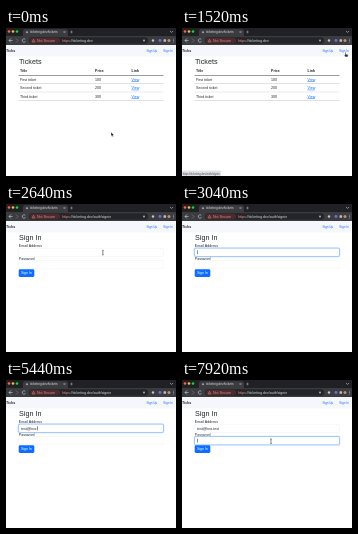
An HTML page with a canvas for the animation above (8000 ms loop, 170x148 px).

```html
<!DOCTYPE html>
<html lang="en">
<head>
<meta charset="utf-8">
<title>Tickets</title>
<style>
html, body { margin: 0; width: 100%; height: 100%; overflow: hidden; background: #fff; }
canvas { display: block; width: 170px; height: 148px; }
</style>
</head>
<body>
<canvas id="stage" width="170" height="148"></canvas>
<script>
const ctx = document.getElementById('stage').getContext('2d');
const LOOP = 8000;
const BLUE = '#0d6efd', INK = '#212529';
const EMAIL = 'test@box.test';
const keyTimes = [3680, 3920, 4080, 4320, 4720, 4960, 5200, 5280, 5440, 6640, 6800, 6960, 6960];
// Pointer stops: time, x, y
const path = [
  [0, 105, 104], [80, 105, 104], [240, 130, 59], [720, 130, 59],
  [1440, 163, 24], [2000, 163, 24], [2240, 121, 44], [2800, 91, 47], [7360, 91, 56], [7600, 89, 59]
];

function box(x, y, w, h, fill, r = 0) {
  ctx.fillStyle = fill;
  ctx.beginPath();
  ctx.roundRect(x, y, w, h, r);
  ctx.fill();
}

function text(s, x, y, size = 3.6, color = INK, weight = 400) {
  ctx.font = `${weight} ${size}px "Liberation Sans", sans-serif`;
  ctx.fillStyle = color;
  ctx.fillText(s, x, y);
  return ctx.measureText(s).width;
}

function dot(x, y, r, color) {
  box(x - r, y - r, 2 * r, 2 * r, color, r);
}

function line(points, color, width = 0.6) {
  ctx.strokeStyle = color;
  ctx.lineWidth = width;
  ctx.beginPath();
  points.forEach(([x, y]) => ctx.lineTo(x, y));
  ctx.stroke();
}

function chrome(signIn) {
  box(0, 0, 170, 8, '#202124');
  ['#ff5f57', '#febc2e', '#28c840'].forEach((c, i) => dot(3 + i * 4, 3.5, 1.3, c));
  box(17, 1.2, 45, 8, '#3b3c40', 2);
  dot(21, 4.2, 1, '#a6a8ac');
  text('ticketing.dev/tickets', 24, 5.3, 3.2, '#dddde0');
  line([[57.5, 3], [59.5, 5]], '#bbb', 0.5);
  line([[59.5, 3], [57.5, 5]], '#bbb', 0.5);
  line([[64, 4], [67, 4]], '#aaa', 0.5);
  line([[65.5, 2.5], [65.5, 5.5]], '#aaa', 0.5);
  line([[164, 3], [165.5, 4.5], [167, 3]], '#ccc', 0.6);

  box(0, 8, 170, 9, '#3b3c40');
  line([[5, 10.5], [3, 12.5], [5, 14.5]], '#d8d8da');
  line([[3, 12.5], [6.5, 12.5]], '#d8d8da');
  line([[10, 10.5], [12, 12.5], [10, 14.5]], '#85868a');
  ctx.strokeStyle = '#d8d8da';
  ctx.beginPath();
  ctx.arc(18, 12.5, 1.7, 0.4, 5.6);
  ctx.stroke();
  box(23, 9.2, 119, 6.6, '#242528', 3.3);
  box(24, 9.8, 30, 5.4, '#4a2b2e', 2.7);
  line([[26, 14], [27.5, 11.3], [29, 14], [26, 14]], '#f28b82', 0.5);
  text('Not Secure', 31, 13.8, 3.6, '#f28b82');
  const scheme = text('https', 56, 13.8, 3.6, '#f28b82');
  text('://ticketing.dev' + (signIn ? '/auth/signin' : ''), 56 + scheme, 13.8, 3.6, '#dcdcdf');
  dot(138, 12.5, 1, '#a9abb0');
  dot(147, 12.5, 1.2, '#c5c6ca');
  dot(154, 12.5, 1.4, '#8b62c9');
  box(157.5, 11.2, 2.6, 2.6, '#b9babf', 0.5);
  dot(163, 12.5, 1.5, '#c88d6d');
  [11, 12.5, 14].forEach(y => dot(167.5, y, 0.4, '#ddd'));

  box(0, 17, 170, 11.5, '#f6f7fc');
  text('Ticks', 0, 24.2, 3.7, INK, 700);
  text('Sign Up', 140.5, 24, 3, BLUE);
  text('Sign In', 157.3, 24, 3, BLUE);
}

function tickets() {
  text('Tickets', 13, 36, 7.2);
  const row = (y, a, b, c, weight) => {
    text(a, 14, y, 3.6, INK, weight);
    text(b, 89, y, 3.6, INK, weight);
    text(c, 125.5, y, 3.6, weight ? INK : BLUE, weight);
  };
  row(44.4, 'Title', 'Price', 'Link', 700);
  box(12.5, 47, 145, 0.8, '#777b80');
  ['First ticket', 'Second ticket', 'Third ticket'].forEach((name, i) => {
    const y = 52.9 + i * 8.4;
    row(y, name, `${i + 1}00`, 'View');
    box(125.5, y + 0.4, 7.5, 0.5, BLUE);
    box(12.5, y + 2.4, 145, 0.6, '#d5d8dc');
  });
}

function field(y, focus) {
  if (focus > 0) {
    ctx.globalAlpha = focus;
    box(11.7, y - 0.8, 146.6, 10, '#c2dbfe', 2);
    ctx.globalAlpha = 1;
  }
  box(12.5, y, 145, 8.4, focus > 0 ? '#86b7fe' : '#eff1f3', 1.4);
  box(13, y + 0.5, 144, 7.4, '#fff', 1);
}

function fade(t, from) {
  return Math.max(0, Math.min(1, (t - from) / 150));
}

function signInForm(t) {
  const inPassword = t >= 7840;
  text('Sign In', 13, 36, 7.2);
  text('Email Address', 12.8, 43.2);
  field(44, inPassword ? 0 : fade(t, 2880));
  text('Password', 12.8, 55.5);
  field(56.5, inPassword ? fade(t, 7760) : 0);
  const typed = EMAIL.slice(0, keyTimes.filter(k => t >= k).length);
  const end = 15 + text(typed, 15, 49.5);
  if (t >= 2960) {
    const lastKey = keyTimes.filter(k => t >= k).pop() || 2960;
    if (inPassword) box(15, 58.7, 0.5, 4, INK);
    else if ((t - lastKey) % 1000 < 500) box(end, 46.2, 0.5, 4, INK);
  }
  box(12.7, 65.2, 15.6, 7.7, BLUE, 1.3);
  text('Sign In', 15, 70.3, 3.5, '#fff');
}

function status(t) {
  if (t < 1360 || t >= 2560) return;
  box(0, 142.6, 39, 5.4, '#dfe1e5', 1);
  text('https://ticketing.dev/auth/signin', 0.8, 146.6, 2.7, '#45484c');
}

function pointerAt(t) {
  let i = path.findIndex(p => p[0] > t);
  if (i < 0) return path[path.length - 1].slice(1);
  const [t0, x0, y0] = path[i - 1], [t1, x1, y1] = path[i];
  const k = (t - t0) / (t1 - t0), e = k * k * (3 - 2 * k);
  return [x0 + (x1 - x0) * e, y0 + (y1 - y0) * e];
}

function polygon(points, fill) {
  ctx.beginPath();
  points.forEach(p => ctx.lineTo(...p));
  ctx.closePath();
  ctx.fillStyle = fill;
  ctx.strokeStyle = '#fff';
  ctx.lineWidth = 0.5;
  ctx.fill();
  ctx.stroke();
}

function pointer(t) {
  if (t >= 2960 && t < 7360) return;
  const [x, y] = pointerAt(t);
  ctx.save();
  ctx.translate(x, y);
  if (t >= 7520 || (t >= 2640 && t < 2960)) {
    line([[0, 0], [0, 4.5]], '#333', 0.6);
    line([[-0.8, 0], [0.8, 0]], '#333', 0.5);
    line([[-0.8, 4.5], [0.8, 4.5]], '#333', 0.5);
  } else if (t >= 1360 && t < 1760) {
    polygon([[0, 0], [1, 0], [1, 2], [3.2, 2.6], [3, 5], [0.2, 5], [-1.2, 2.8], [0, 3]], '#333');
  } else {
    polygon([[0, 0], [0, 4.4], [1, 3.5], [1.7, 5], [2.4, 4.7], [1.8, 3.3], [3.1, 3.2]], '#111');
  }
  ctx.restore();
}

function draw(t) {
  const signIn = t >= 1760;
  box(0, 0, 170, 148, '#fff');
  chrome(signIn);
  if (signIn) signInForm(t); else tickets();
  status(t);
  pointer(t);
}

const start = performance.now();
function tick() {
  draw((performance.now() - start) % LOOP);
  requestAnimationFrame(tick);
}
tick();
</script>
</body>
</html>
```
